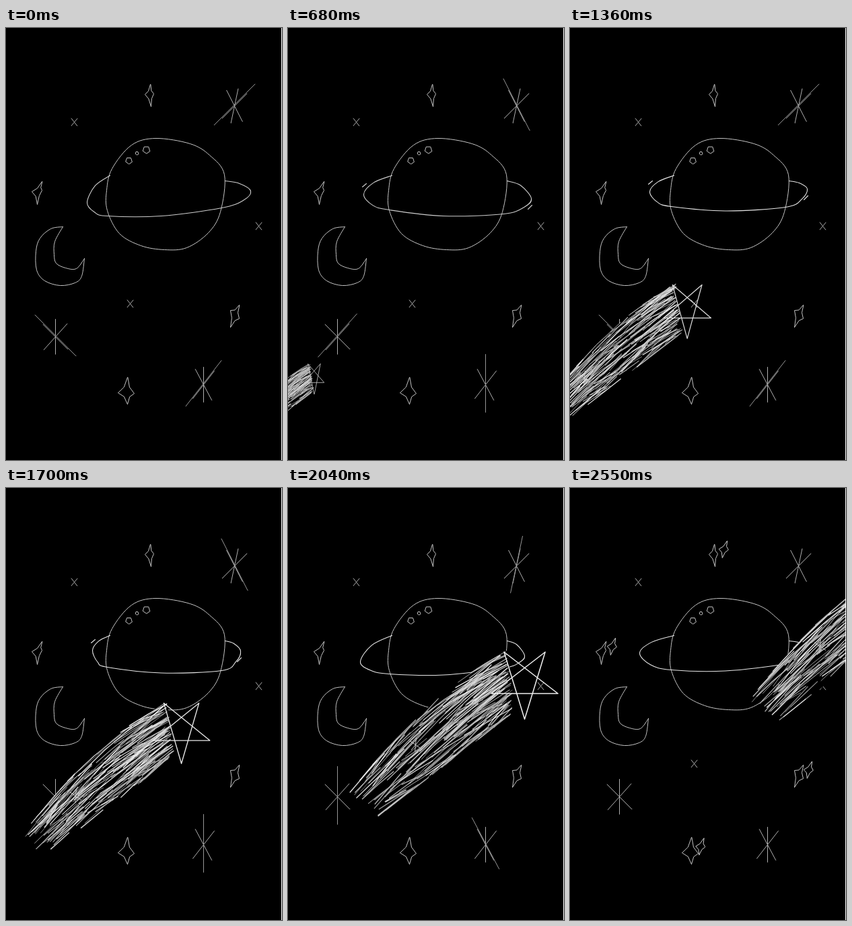
Recreate the animation shown at these times as an HTML page with a canvas. Size 410 by 640 pixels, loop 2720 ms.

```html
<!DOCTYPE html>
<html lang="en">
<head>
<meta charset="utf-8">
<title>Ringed planet and comet</title>
<style>
html, body { margin: 0; width: 100%; height: 100%; overflow: hidden; background: #000; }
canvas { display: block; width: 410px; height: 640px; }
</style>
</head>
<body>
<canvas id="sky" width="410" height="640"></canvas>
<script>
const STEP = 170, COUNT = 16;
const ctx = document.getElementById('sky').getContext('2d');

// Ring: step, left x,y, right x,y, height where it crosses the planet's left and right side.
const RING = [
  [0, 120, 258, 363, 241, 278, 266],
  [4, 112, 246, 361, 252, 269, 275],
  [6, 111, 242, 352, 247, 262, 269],
  [8, 118, 242, 352, 238, 264, 265],
  [10, 128, 240, 348, 241, 265, 270],
  [12, 107, 257, 351, 248, 275, 266],
  [15, 103, 244, 358, 238, 269, 260]
];

// Comet: step, x, y, size.
const COMET = [
  [3, 2, 529, 0.3], [4, 33, 496, 0.45], [6, 79, 438, 0.65], [8, 157, 378, 0.8],
  [10, 239, 316, 0.9], [12, 325, 240, 1], [15, 507, 94, 1]
];

const PLANET = [[222, 163], [273, 171], [302, 188], [324, 217], [318, 272], [300, 303], [268, 325],
  [235, 328], [200, 322], [168, 304], [150, 270], [149, 240], [157, 208], [186, 173]];
const MOON_OUT = [[84, 294], [66, 297], [50, 311], [44, 330], [45, 358], [57, 374], [80, 381],
  [102, 377], [112, 367], [116, 341]];
const MOON_IN = [[116, 341], [104, 356], [88, 355], [74, 348], [71, 335], [72, 316], [84, 294]];

// Sparkles by their four tips.
const SPARKS = [
  [[214, 83], [206, 98], [215, 116], [219, 97]],
  [[53, 227], [38, 242], [46, 261], [53, 240]],
  [[346, 410], [333, 418], [333, 443], [346, 430]],
  [[180, 517], [166, 540], [180, 557], [190, 541]]
];
const GLINT = [[4, -13], [-8, -1], [-3, 12], [6, 0]];

// Big stars: centre and arm angles, in the order the long ray visits them.
const STARS = [
  { x: 339, y: 115, arms: [63, 102, 135] },
  { x: 73, y: 457, arms: [132, 90, 45] },
  { x: 293, y: 528, arms: [90, 62, 128] }
];
const CROSSES = [[101, 139], [375, 293], [184, 408]];
const CRATERS = [[182, 196, 5], [194, 185, 2.5], [208, 180, 5.5]];

const mix = (a, b, k) => a + (b - a) * k;
const mixPt = (p, q, k) => [mix(p[0], q[0], k), mix(p[1], q[1], k)];
const polar = (x, y, rx, ry, deg) => {
  const a = deg * Math.PI / 180;
  return [x + rx * Math.cos(a), y + ry * Math.sin(a)];
};

function at(rows, n) {
  const i = rows.findIndex(r => r[0] >= n), b = rows[i], a = rows[i - 1] || b;
  const k = a === b ? 0 : (n - a[0]) / (b[0] - a[0]);
  return b.slice(1).map((v, j) => mix(a[j + 1], v, k));
}

function random(seed) {
  let s = seed * 7919 + 17;
  return () => (s = s * 16807 % 2147483647) / 2147483647;
}

function pen(level, width = 1) {
  ctx.strokeStyle = `rgb(${level},${level},${level})`;
  ctx.lineWidth = width;
}

function line(pts, close) {
  ctx.beginPath();
  pts.forEach(p => ctx.lineTo(...p));
  if (close) ctx.closePath();
  ctx.stroke();
}

// Smooth stroke through the points.
function curve(pts, close) {
  const n = pts.length;
  const pt = i => pts[close ? (i + n) % n : Math.max(0, Math.min(n - 1, i))];
  ctx.beginPath();
  ctx.moveTo(...pts[0]);
  for (let i = 0; i < (close ? n : n - 1); i++) {
    const a = pt(i - 1), b = pt(i), c = pt(i + 1), d = pt(i + 2);
    ctx.bezierCurveTo(b[0] + (c[0] - a[0]) / 6, b[1] + (c[1] - a[1]) / 6,
      c[0] - (d[0] - b[0]) / 6, c[1] - (d[1] - b[1]) / 6, ...c);
  }
  ctx.stroke();
}

function arm(x, y, r, deg) {
  line([polar(x, y, r, r, deg), polar(x, y, -r, -r, deg)]);
}

function centre(pts) {
  return [0, 1].map(j => pts.reduce((sum, p) => sum + p[j], 0) / pts.length);
}

function sparkle(tips) {
  const mid = centre(tips);
  line(tips.flatMap((p, i) => [p, mixPt(mixPt(p, tips[(i + 1) % 4], 0.5), mid, 0.3)]), true);
}

function scenery() {
  pen(196);
  curve(PLANET, true);
  curve(MOON_OUT);
  curve(MOON_IN);
  SPARKS.forEach(sparkle);
  for (const [x, y, r] of CRATERS) {
    line([0, 1, 2, 3, 4].map(i => polar(x, y, r, r, 90 + 72 * i)), true);
  }
  pen(175);
  for (const [x, y] of CROSSES) {
    arm(x, y, 7, 52);
    arm(x, y, 7, 130);
  }
  for (const { x, y, arms } of STARS) arms.forEach(deg => arm(x, y, 26, deg));
}

// Long rays visit the arms in turn; between rounds the sparkles get a twin.
function twinkle(n) {
  const k = n % 12;
  if (k >= 1 && k <= 3) {
    pen(205);
    for (const tips of SPARKS) {
      const [x, y] = polar(...centre(tips), 17, 17, 62 * k - 212);
      sparkle(GLINT.map(p => [p[0] + x, p[1] + y]));
    }
  } else {
    pen(150);
    const turn = Math.floor(Math.max(n, 2) / 2 + 1) % 3;
    for (const { x, y, arms } of STARS) arm(x, y - 2, 43, arms[turn]);
  }
}

function ring(n) {
  const [lx, ly, rx, ry, dropL, dropR] = at(RING, n);
  pen(n >= 8 ? 230 : 205, 1.1);
  curve([
    [154, 218], [mix(lx, 154, 0.35), mix(ly, 218, 0.62)], [lx, ly],
    [mix(lx, 150, 0.35), mix(ly, dropL, 0.7)], [150, dropL],
    [230, (dropL + dropR) / 2 + 6], [320, dropR],
    [mix(rx, 320, 0.25), mix(ry, dropR, 0.55)], [rx, ry],
    [mix(325, rx, 0.55), mix(226, ry, 0.25)], [325, 226]
  ]);
  if (n > 3 && n < 12) {
    line([[lx - 2, ly - 11], [lx + 4, ly - 16]]);
    line([[rx - 5, ry + 16], [rx + 1, ry + 10]]);
  }
}

function comet(n) {
  if (n < COMET[0][0]) return;
  const [x, y, size] = at(COMET, n);
  const rnd = random(n + 3);

  // Point in the tail: k runs from head to end, v from upper to lower edge.
  const spot = (k, v) => {
    const bulge = 88 * k * (1 - k) * (1 - v);
    return [x + size * mix(-237 * k, 12 - 212 * k, v),
      y + size * (mix(215 * k, 90 + 162 * k, v) - bulge)];
  };

  ctx.fillStyle = '#000';
  ctx.beginPath();
  for (let k = 0; k < 0.9; k += 0.1) ctx.lineTo(...spot(k, 0));
  ctx.lineTo(...spot(0.8, 1));
  ctx.lineTo(...spot(0, 1));
  ctx.fill();

  for (let i = 0; i < 200; i++) {
    const k0 = i % 4 ? rnd() * 0.82 : rnd() * 0.05;
    const k1 = Math.min(k0 + 0.12 + rnd() * 0.26, 0.88 + rnd() * 0.14);
    const v0 = rnd();
    const v1 = Math.max(0, Math.min(1, v0 + (rnd() - 0.5) * 0.26));
    pen(Math.round(mix(150, 245, rnd())), mix(0.7, 1.5, rnd() * size));
    line([spot(k0, v0), spot((k0 + k1) / 2, (v0 + v1) / 2), spot(k1, v1)]);
  }
  if (n >= 8) {
    pen(205);
    [95, 35, 130].forEach(deg => arm(x - 136, y + 140, 10, deg));
  }

  pen(Math.round(mix(150, 240, size)), mix(0.7, 1.5, size * size));
  const wide = 52 * size ** 1.5, cx = x + 26 * size * size, cy = y + 47 * size;
  line([0, 1, 2, 3, 4].map(i => polar(cx, cy, wide, 55 * size, 90 + 144 * i)), true);
}

function draw(n) {
  ctx.fillStyle = '#000';
  ctx.fillRect(0, 0, 410, 640);
  ctx.save();
  ctx.translate(0.5, 0.5);
  scenery();
  twinkle(n);
  ring(n);
  comet(n);
  ctx.restore();
  ctx.fillStyle = '#fff';
  ctx.fillRect(409, 0, 1, 640);
}

ctx.lineCap = ctx.lineJoin = 'round';
const start = performance.now();
let shown = -1;
function tick() {
  const n = Math.floor((performance.now() - start) / STEP) % COUNT;
  if (n !== shown) draw(shown = n);
  requestAnimationFrame(tick);
}
tick();
</script>
</body>
</html>
```
